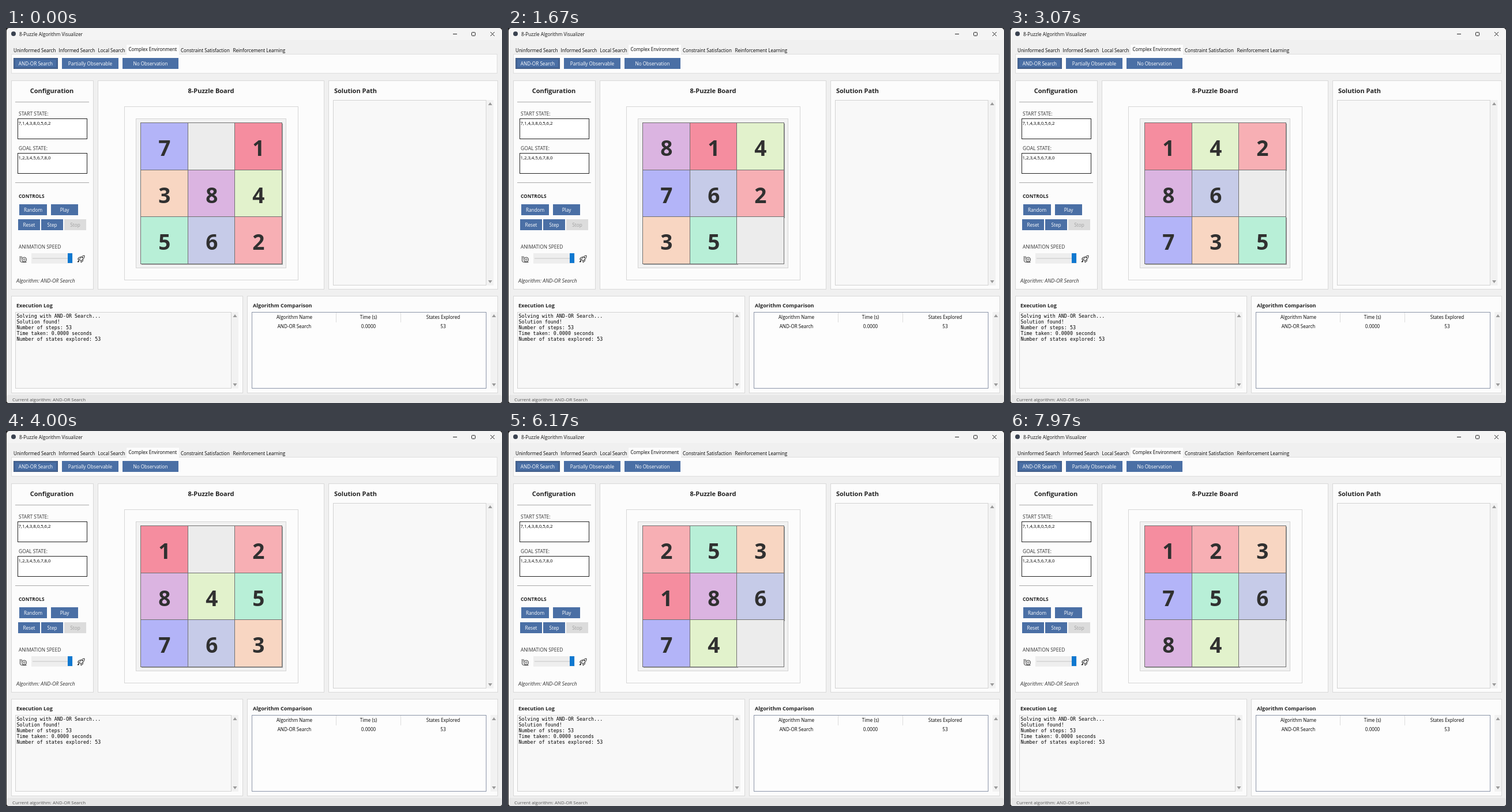
These frames come from a looping animation (860 by 651 pixels, 8 s). An HTML page:

```html
<!DOCTYPE html>
<html lang="en">
<head>
<meta charset="utf-8">
<title>8-Puzzle Algorithm Visualizer</title>
<style>
  html, body { margin: 0; width: 100%; height: 100%; overflow: hidden; background: #222; }
  svg { display: block; width: 860px; height: 651px; }
  text { font-family: "Open Sans", "Noto Sans", sans-serif; white-space: pre; }
  .mono { font-family: "DejaVu Sans Mono", monospace; }
  .bold { font-weight: 700; }
  .italic { font-style: italic; }
</style>
</head>
<body>
<svg id="stage" viewBox="0 0 860 651"></svg>
<script>
const stage = document.getElementById('stage');

function add(tag, attrs, content) {
  const el = document.createElementNS('http://www.w3.org/2000/svg', tag);
  for (const key in attrs) el.setAttribute(key, attrs[key]);
  if (content !== undefined) el.textContent = content;
  return stage.appendChild(el);
}
const fillBox = (x, y, right, bottom, fill, extra) =>
  add('rect', { x, y, width: right - x, height: bottom - y, fill, ...extra });
// Outlined box with a crisp one-pixel border
const frame = (x, y, right, bottom, stroke, fill = 'none') =>
  fillBox(x + .5, y + .5, right - .5, bottom - .5, fill, { stroke });
const path = (d, stroke, extra) => add('path', { d, stroke, fill: 'none', ...extra });
const label = (text, x, y, size = 8.1, fill = '#111', cls = '', anchor = 'start') =>
  add('text', { x, y, 'font-size': size, fill, class: cls, 'text-anchor': anchor }, text);
const centred = (text, x, y, size, fill, cls) => label(text, x, y, size, fill, cls, 'middle');

function button(text, x, y, right, fill = '#4a6fa5', color = '#fff') {
  fillBox(x, y, right, y + 19, fill);
  centred(text, (x + right) / 2, y + 12.5, 8.2, color);
}
function scrollbar(x, top, bottom) {
  fillBox(x - 6, top, x + 6, bottom, '#f2f2f2');
  add('path', { d: `M${x - 3.5} ${top + 9}l3.5 -5l3.5 5z`, fill: '#999' });
  add('path', { d: `M${x - 3.5} ${bottom - 9}l3.5 5l3.5 -5z`, fill: '#999' });
}

// Window and title bar
fillBox(1, 0, 860, 651, '#f0f0f0', { rx: 5 });
fillBox(1.5, 1, 859.5, 21, '#f4f4f4', { rx: 5 });
add('circle', { cx: 13, cy: 10, r: 4, fill: '#3a4250' });
label('8-Puzzle Algorithm Visualizer', 23, 13.5, 8.2);
path('M775 10.5h7M840 7l7 7M847 7l-7 7', '#222');
add('rect', { x: 807.5, y: 7.5, width: 6, height: 6, rx: 1, fill: 'none', stroke: '#222' });

// Tabs
frame(9, 45, 852, 79, '#dedede', '#fcfcfc');
fillBox(209, 29, 300, 46, '#fcfcfc');
[['Uninformed Search', 13], ['Informed Search', 91.5], ['Local Search', 159.5],
 ['Complex Environment', 212.5, 40], ['Constraint Satisfaction', 303], ['Reinforcement Learning', 393.5]]
  .forEach(([text, x, y = 41.5]) => label(text, x, y, 8.1, '#000'));
button('AND-OR Search', 13, 52, 90);
frame(13, 52, 90, 71, '#3a5178');
add('rect', { x: 15.5, y: 54.5, width: 72, height: 14, fill: 'none', stroke: '#33496b', 'stroke-dasharray': '1 1' });
button('Partially Observable', 97, 52, 195);
button('No Observation', 202, 52, 299);

// Panels
[[9, 91, 152, 454], [159, 91, 552, 454], [559, 91, 853, 454], [9, 465, 411, 634], [418, 465, 853, 634]]
  .forEach(box => frame(...box, '#d9d9d9', '#fcfcfc'));

// Configuration
centred('Configuration', 79.5, 113, 11, '#222', 'bold');
path('M16 128.5H144M16 268.5H144', '#a8a8a8');
[['START STATE:', '7,1,4,3,8,0,5,6,2', 157], ['GOAL STATE:', '1,2,3,4,5,6,7,8,0', 217]]
  .forEach(([title, value, y]) => {
    label(title, 22, y - 5.5, 8.5, '#333');
    frame(20, y, 141, y + 36, '#222', '#fff');
    label(value, 21.5, y + 10.5, 7.9, '#000');
  });
label('CONTROLS', 22, 294.5, 8.3, '#222', 'bold');
button('Random', 23, 306, 71);
button('Play', 78, 306, 125);
button('Reset', 21, 332, 59);
button('Step', 61, 332, 99);
button('Stop', 101, 332, 139, '#dcdcdc', '#a0a0a0');
label('ANIMATION SPEED', 22, 382.5, 8.4, '#333');
fillBox(44, 391, 116, 409, '#eeeeee');
fillBox(46, 399, 108, 401, '#dadada');
fillBox(107, 391, 115, 408, '#0f78d0');
// Snail and rocket
path('M24.5 396v8q0 2.500 3 2.500h8M27 396v4', '#333');
add('circle', { cx: 31.5, cy: 402, r: 4, fill: '#fcfcfc', stroke: '#333' });
add('circle', { cx: 31.5, cy: 402, r: 1.5, fill: 'none', stroke: '#333', 'stroke-width': .8 });
path('M136 395q-5 0 -8.500 6.500l2.500 2.500q6.500 -3.500 6 -9zM130 397.500l-4 1l-1.500 3l3 0M133.500 401l-.5 4l-3 2v-3', '#222');
path('M127 403l-2.500 3.500', '#222', { 'stroke-width': 2 });
add('circle', { cx: 132.5, cy: 398.5, r: 1.2, fill: '#222' });
label('Algorithm: AND-OR Search', 18, 442, 8.8, '#333', 'italic');

// Solution path
label('Solution Path', 569, 113, 11, '#222', 'bold');
frame(567, 125, 833, 447, '#d2d2d2', '#f8f8f8');
scrollbar(839.5, 125, 447);

// Execution log
label('Execution Log', 18, 485, 9.1, '#222', 'bold');
frame(16, 493, 391, 626, '#d2d2d2', '#f8f8f8');
scrollbar(397, 493, 626);
['Solving with AND-OR Search...', 'Solution found!', 'Number of steps: 53',
 'Time taken: 0.0000 seconds', 'Number of states explored: 53']
  .forEach((line, i) => label(line, 18.5, 503 + i * 10, 8.36, '#000', 'mono'));

// Comparison table
label('Algorithm Comparison', 428, 485, 9.1, '#222', 'bold');
frame(426, 493, 833, 626, '#8b95a8', '#fdfdfd');
scrollbar(846, 493, 626);
path('M572.5 494V511M684.5 494V511', '#dcdcdc');
[['Algorithm Name', 'AND-OR Search', 500], ['Time (s)', '0.0000', 628.5], ['States Explored', '53', 758]]
  .forEach(([head, cell, x]) => {
    centred(head, x, 505, 8.1, '#000');
    centred(cell, x, 521, 8.1, '#000');
  });

// Status bar
fillBox(1, 637, 860, 651, '#e7e7e7', { rx: 4 });
label('Current algorithm: AND-OR Search', 11, 647.5, 7.9, '#555');

// Puzzle board
centred('8-Puzzle Board', 355.5, 113, 11, '#222', 'bold');
frame(205, 136, 507, 438, '#d6d6d6');
frame(225, 157, 486, 417, '#d4d4d4', '#f2f2f2');

const colors = ['#ececec', '#f58d9f', '#f7afb4', '#f8d6c2', '#e2f2cc', '#b8efd7', '#c6cbe8', '#b3b4f8', '#dbb4e1'];
const size = 82;
// Cell pitch is fractional; edges snap to whole pixels
const snap = (origin, n) => origin + Math.round(n * 81.6) + .5;
const cells = [...Array(9).keys()].map(i => {
  const x = snap(233, i % 3), y = snap(164, Math.floor(i / 3));
  return { x, y, width: size, height: size };
});
const shadows = cells.map(c => add('rect', { ...c, x: c.x + 1.5, y: c.y + 1.5, fill: '#999' }));
const faces = cells.map(c => add('rect', { ...c, stroke: '#707070' }));
const digits = cells.map(c => centred('', c.x + 41.3, c.y + 57, 37, '#303030', 'bold'));

// Each letter is the direction in which the gap travels
const moves = 'DDLUURRDDLLUURRDDLUURDDLULURRDDLUULDDRR';
const offset = { U: -3, D: 3, L: -1, R: 1 };
const states = [[7, 0, 1, 3, 8, 4, 5, 6, 2]];
for (const move of moves) {
  const next = states[states.length - 1].slice();
  const gap = next.indexOf(0), from = gap + offset[move];
  next[gap] = next[from];
  next[from] = 0;
  states.push(next);
}

// [move count, time in ms]; the pace is even between entries
const pace = [[1, 23], [16, 3068], [25, 5010], [31, 6148], [40, 7975]];
function movesDone(time) {
  if (time < pace[0][1]) return 0;
  for (let i = 1; i < pace.length; i++) {
    const [n0, t0] = pace[i - 1], [n1, t1] = pace[i];
    if (time < t1) return Math.floor(n0 + (n1 - n0) * (time - t0) / (t1 - t0));
  }
  return moves.length;
}

function show(state) {
  state.forEach((n, i) => {
    faces[i].setAttribute('fill', colors[n]);
    shadows[i].setAttribute('visibility', n ? 'visible' : 'hidden');
    digits[i].textContent = n || '';
  });
}

const begin = performance.now();
let shown = -1;
function draw() {
  const step = movesDone((performance.now() - begin) % 8000);
  if (step !== shown) show(states[shown = step]);
  requestAnimationFrame(draw);
}
draw();
</script>
</body>
</html>
```
